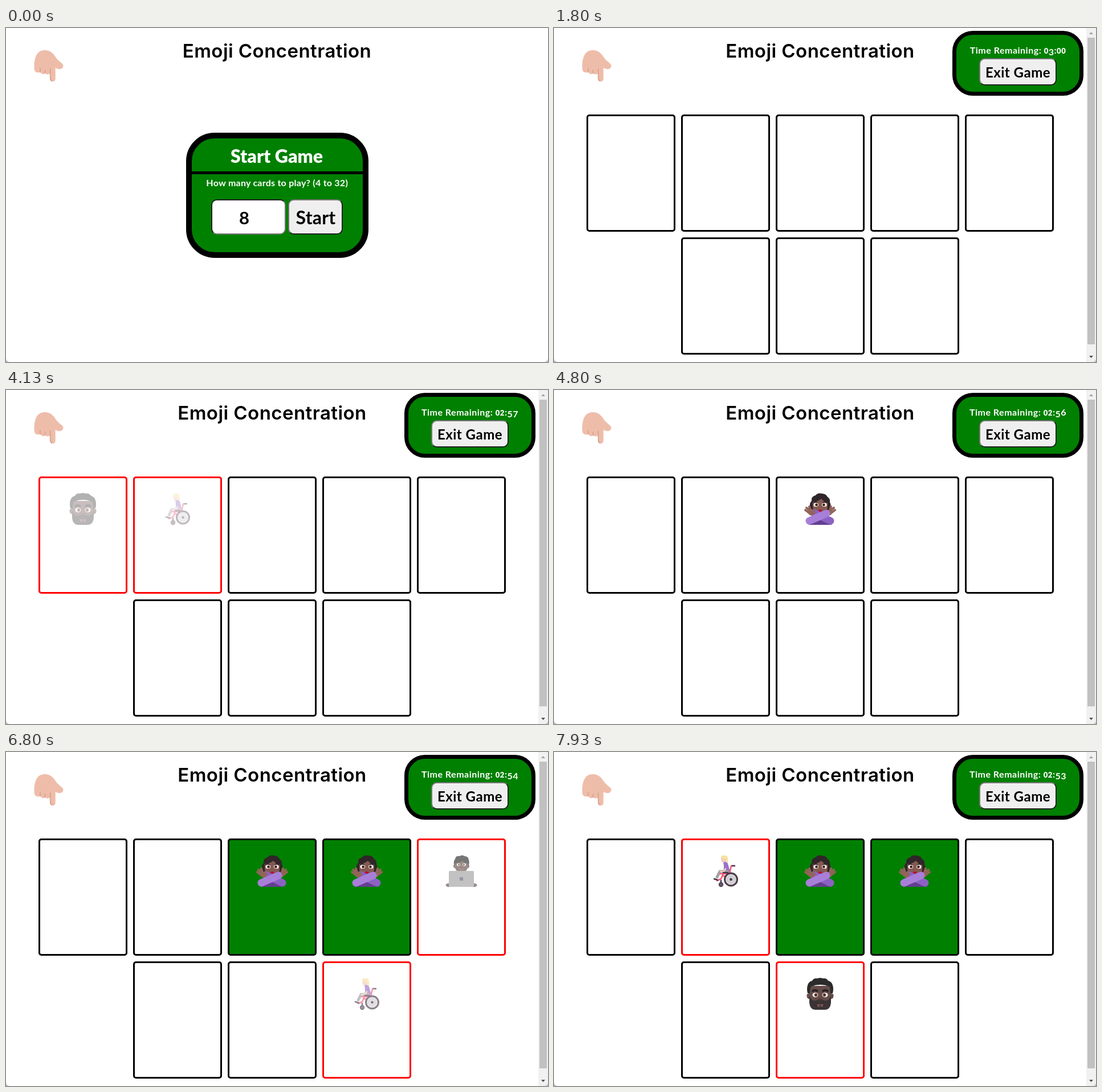
An HTML page for the animation above (8 s loop, 951 by 587 pixels).

```html
<!DOCTYPE html>
<html lang="en">
<head>
<meta charset="utf-8">
<title>Emoji Concentration</title>
<style>
  html, body { margin: 0; width: 100%; height: 100%; overflow: hidden; background: #c4c4c4; }
  #stage { position: absolute; left: 0; top: 0; width: 951px; height: 587px; overflow: hidden;
    background: #fff; border-radius: 0 0 7px 7px; }
  svg { position: absolute; left: 0; top: 0; }
  .box { position: absolute; box-sizing: border-box; }
  .panel { background: #008000; border: solid #000; }
  .field { background: #fff; border: 2px solid; border-color: #212121 #767676 #767676 #212121; border-radius: 10px; }
  .button { background: #efefef; border: 2px solid; border-color: #767676 #212121 #212121 #767676; border-radius: 10px; }
  .card { width: 156px; height: 206px; border: 3px solid #000; border-radius: 5px; }
  text { font-family: Lato, "Noto Sans", sans-serif; font-weight: 700; text-anchor: middle; }
  .title { font: 600 33px Inter, "Open Sans", sans-serif; letter-spacing: .45px; }
  .small { font-size: 16px; fill: #fff; }
  .low { font-size: 13px; font-weight: 900; }
  .track { background: #f1f1f1; }
  .thumb { background: #c1c1c1; }
</style>
</head>
<body>
<div id="stage">
  <div id="menu">
    <div class="box panel" style="left:316px;top:184px;width:320px;height:220px;border-width:10px;border-radius:50px"></div>
    <div class="box" style="left:326px;top:252px;width:300px;height:5px;background:#000"></div>
    <div class="box field" style="left:360px;top:301px;width:131px;height:62px"></div>
    <div class="box button" style="left:495px;top:301px;width:96px;height:62px"></div>
    <svg width="951" height="587">
      <text class="title" x="475.5" y="52">Emoji Concentration</text>
      <text x="475" y="237" font-size="32" fill="#fff" style="font-weight:900">Start Game</text>
      <text x="475.7" y="278" class="small" letter-spacing=".25">How many cards to play? (4 to 32)</text>
      <text x="418" y="345" font-size="31">8</text>
      <text x="543.5" y="345" font-size="32" letter-spacing=".2">Start</text>
      <g id="spinner">
        <path d="M475 303h14v58h-14z" fill="#efefef"/>
        <path id="spinHover" d="M475 303h14v29h-14z" fill="#d2d2d2"/>
        <path d="M478.5 320l3.5-4 3.5 4zM478.5 344l3.5 4 3.5-4z" fill="#505050"/>
      </g>
    </svg>
  </div>

  <div id="game">
    <div class="box panel" style="left:699px;top:5px;width:230px;height:114px;border-width:7px;border-radius:36px"></div>
    <div class="box button" style="left:746px;top:53px;width:136px;height:48px"></div>
    <div class="box track" style="left:934px;top:0;width:17px;height:587px"></div>
    <div class="box thumb" style="left:936px;top:17px;width:13px;height:539px"></div>
    <div id="cards"></div>
    <svg width="951" height="587">
      <text class="title" x="467" y="52">Emoji Concentration</text>
      <text id="timer" class="small" x="814" y="45" letter-spacing=".5"></text>
      <text x="814" y="87" font-size="24" letter-spacing=".5">Exit Game</text>
      <path d="M939 11l3.5-4 3.5 4z" fill="#a3a3a3"/>
      <path d="M939 576l3.5 4 3.5-4z" fill="#505050"/>
    </svg>
    <svg id="faces" width="951" height="587"></svg>
  </div>

  <!-- pointing hand -->
  <svg width="130" height="110">
    <path fill="#eebdaa" d="M49.5 71C49 50 55 39 68 39C78 39 83 45 87 51C90 56 95 59 99 63C102 66 100 71 96 72C92 73 89 71 86.7 70V89Q86.7 94 82 94Q77 94 77 89V80Q73 83 69 80Q64 83 60 78Q50 80 49.5 71Z"/>
    <path fill="none" stroke="#d5a08c" stroke-width="1.6" stroke-linecap="round" d="M60 71v6M68.5 74v5M77.6 72v14q0 5 3 7"/>
  </svg>

  <svg width="0" height="0">
    <defs>
      <g id="eyes">
        <ellipse cx="-8.5" cy="2" rx="5" ry="4" fill="#fff"/><ellipse cx="8.5" cy="2" rx="5" ry="4" fill="#fff"/>
        <circle cx="-7.5" cy="2" r="3" fill="#7d4533"/><circle cx="7.5" cy="2" r="3" fill="#7d4533"/>
        <circle cx="-7.5" cy="2" r="1.7" fill="#1c1c1c"/><circle cx="7.5" cy="2" r="1.7" fill="#1c1c1c"/>
      </g>

      <g id="man">
        <path fill="#5a403d" d="M-19-14H19V0Q24-1 23.5 4Q23 9 19 9V16H-19V9Q-23 9-23.5 4Q-24-1-19 0Z"/>
        <path fill="#1c1c1c" d="M-22-1Q-24-9-22-15Q-20-22-14-23Q-11-28-5-27Q0-29 5-27Q11-28 14-23Q20-22 22-15Q24-9 22-1L18 0Q18-9 16-13Q0-19-16-13Q-18-9-18 0Z"/>
        <path fill="#2e2527" d="M-19 3Q-16 12-9 12Q0 8 9 12Q16 12 19 3V15Q18 28 8 28H-8Q-18 28-19 15Z"/>
        <path fill="none" stroke="#151214" stroke-width="3.5" stroke-linecap="round" d="M-13-5Q-9-8-5-5M5-5Q9-8 13-5"/>
        <use href="#eyes"/>
        <path fill="#432d2b" d="M-4 10Q0 5 4 10Q0 13-4 10Z"/>
        <path fill="#7c4a48" d="M-6 16H6L4 23H2L0 19L-2 23H-4Z"/>
        <path fill="#1c1c1c" d="M-6 15Q0 18 6 15V17Q0 20-6 17Z"/>
      </g>

      <g id="chair" stroke-linecap="round" stroke-linejoin="round">
        <path fill="#f1cbb9" d="M-8-23H1V-15H-6Q-8-17-8-23Z"/>
        <path fill="#f6e19b" d="M-8-22Q-9-28-3-27Q4-28 4-22Q5-17 4-14L1-16Q1-21-2-22Z"/>
        <path fill="#9169c4" d="M-4-15Q2-17 4-13L7-2V3H-4Q-2-7-4-15Z"/>
        <path fill="none" stroke="#9b9b9b" stroke-width="5" d="M3 1H-10L-15 11"/>
        <path fill="none" stroke="#f1cbb9" stroke-width="2.5" d="M0-4L-3 1L-9 1"/>
        <path fill="none" stroke="#f34a68" stroke-width="2.5" d="M13-9H10L7 5H-9M-4 5L-8 14L-15 17M-5 9H6V14"/>
        <path fill="none" stroke="#3c2743" stroke-width="2.5" d="M12-9H16M-4 3H4M-20 14L-14 16M-8 17V22"/>
        <circle cx="9.5" cy="15" r="11" fill="#d5d3d8" stroke="#3f2c3c" stroke-width="3"/>
        <circle cx="9.5" cy="15" r="6" fill="none" stroke="#bdbac1" stroke-width="1"/>
        <circle cx="9.5" cy="15" r="2.4" fill="#3f2c3c"/>
        <circle cx="-8" cy="24" r="3.5" fill="#5c4b69" stroke="#3f2c3c" stroke-width="1.4"/>
      </g>

      <g id="woman" stroke-linecap="round">
        <path fill="#302629" d="M-17-2Q-20-9-15-14Q-16-22-8-24Q-4-29 3-27Q10-27 13-21Q18-18 17-12Q20-6 17 0Q15 3 12 2H-12Q-16 2-17-2Z"/>
        <path fill="#855a52" d="M-13-12Q-3-13 2-18Q7-12 13-11V-3Q12 8 0 9Q-12 8-13-3Z"/>
        <path fill="none" stroke="#302629" stroke-width="2" d="M-11-11Q-8-13-5-11M5-11Q8-13 11-11"/>
        <use href="#eyes" transform="translate(0 -9) scale(.85)"/>
        <ellipse cx="0" cy="3" rx="3.5" ry="2" fill="#b3123c"/>
        <path fill="none" stroke="#926459" stroke-width="4" d="M-17 4L-24-2M-18 8L-26 2M-17 3L-19-4M17 4L24-2M18 8L26 2M17 3L19-4"/>
        <path fill="#633f91" d="M-17 14H17L20 28H-20Z"/>
        <path stroke="#8b62c3" stroke-width="13" d="M-11 7L18 21"/>
        <path stroke="#926459" stroke-width="9" d="M-16 7L-13 6M16 7L13 6"/>
        <path stroke="#a77fd9" stroke-width="13" d="M-19 21L11 8"/>
      </g>

      <g id="laptop">
        <path fill="#5a403d" d="M-11-19H11V-11Q14-12 14-8Q14-5 11-5Q9 2 0 3Q-9 2-11-5Q-14-5-14-8Q-14-12-11-11Z"/>
        <path fill="#1c1c1c" d="M-12-9Q-15-16-11-21Q-10-27-3-26Q1-29 6-26Q13-25 13-19Q15-14 12-9L10-14Q5-14 2-18Q-3-14-10-14Z"/>
        <use href="#eyes" transform="translate(0 -12) scale(.58)"/>
        <path fill="none" stroke="#8a5550" stroke-width="1.5" d="M-4-4Q0-1 4-4"/>
        <ellipse cx="-22" cy="25" rx="5.5" ry="3.2" fill="#5a403d"/><ellipse cx="22" cy="25" rx="5.5" ry="3.2" fill="#5a403d"/>
        <rect x="-22" y="0" width="44" height="28" rx="2" fill="#9b9b9b"/>
        <rect x="-3" y="11" width="6" height="6" fill="#54506a"/>
      </g>
    </defs>
  </svg>
</div>

<script>
const LOOP = 8000, STEP = 1000 / 15, FADE_STEPS = 15;
const GAME_START = 1670, MATCH_AT = 5000, MATCHED = [2, 3];
const clock = [[0, '03:00'], [2800, '02:58'], [3800, '02:57'], [4800, '02:56'],
  [5800, '02:55'], [6800, '02:54'], [7730, '02:53']];

// card, emoji, turned over at, start of the mismatch fade
const turns = [
  [0, 'man', 3000, 3470], [1, 'chair', 3470, 3470],
  [2, 'woman', 4200], [3, 'woman', MATCH_AT],
  [4, 'laptop', 5730, 6400], [7, 'chair', 6400, 6400],
  [6, 'man', 7130, 7870], [1, 'chair', 7870, 7870]
];

const $ = id => document.getElementById(id);
const NS = 'http://www.w3.org/2000/svg';
const cardPos = i => i < 5 ? [57 + 166 * i, 152] : [223 + 166 * (i - 5), 368];
const show = (el, on) => { el.style.display = on ? '' : 'none'; };

const cards = Array.from({ length: 8 }, (_, i) => {
  const el = document.createElement('div');
  const [x, y] = cardPos(i);
  el.className = 'box card';
  el.style.left = x + 'px';
  el.style.top = y + 'px';
  return $('cards').appendChild(el);
});

const faces = turns.map(([card, emoji]) => {
  const el = document.createElementNS(NS, 'use');
  const [x, y] = cardPos(card);
  el.setAttribute('href', '#' + emoji);
  el.setAttribute('transform', `translate(${x + 78} ${y + 57})`);
  return $('faces').appendChild(el);
});

// Old-style figures: low 0-2, descending 3, 4, 5, 7 and 9.
function setTimer(value) {
  const line = $('timer');
  if (line.dataset.value === value) return;
  line.dataset.value = value;
  line.textContent = 'Time Remaining: ';
  let drop = 0;
  for (const ch of value) {
    const span = document.createElementNS(NS, 'tspan');
    const next = '34579'.includes(ch) ? 3 : 0;
    span.textContent = ch;
    span.setAttribute('dy', next - drop);
    if ('012'.includes(ch)) span.setAttribute('class', 'low');
    drop = next;
    line.append(span);
  }
}

function draw(t) {
  const playing = t >= GAME_START;
  show($('menu'), !playing);
  show($('game'), playing);
  show($('spinner'), t >= 1070 && t < 1400);
  show($('spinHover'), t >= 1330);
  setTimer(clock.filter(([at]) => t >= at).pop()[1]);

  cards.forEach((el, i) => {
    el.style.borderColor = '#000';
    el.style.background = t >= MATCH_AT && MATCHED.includes(i) ? '#008000' : '#fff';
  });
  turns.forEach(([card, , from, fadeAt = Infinity], i) => {
    const step = t < fadeAt ? -1 : Math.floor((t - fadeAt) / STEP + .15);
    const fading = step >= 0 && step < FADE_STEPS;
    if (fading) cards[card].style.borderColor = step ? '#f00' : '#fff';
    faces[i].style.opacity = fading ? 1 - step / FADE_STEPS : 1;
    show(faces[i], t >= from && step < FADE_STEPS);
  });
}

const began = performance.now();
function tick() {
  draw((performance.now() - began) % LOOP);
  requestAnimationFrame(tick);
}
tick();
</script>
</body>
</html>
```
